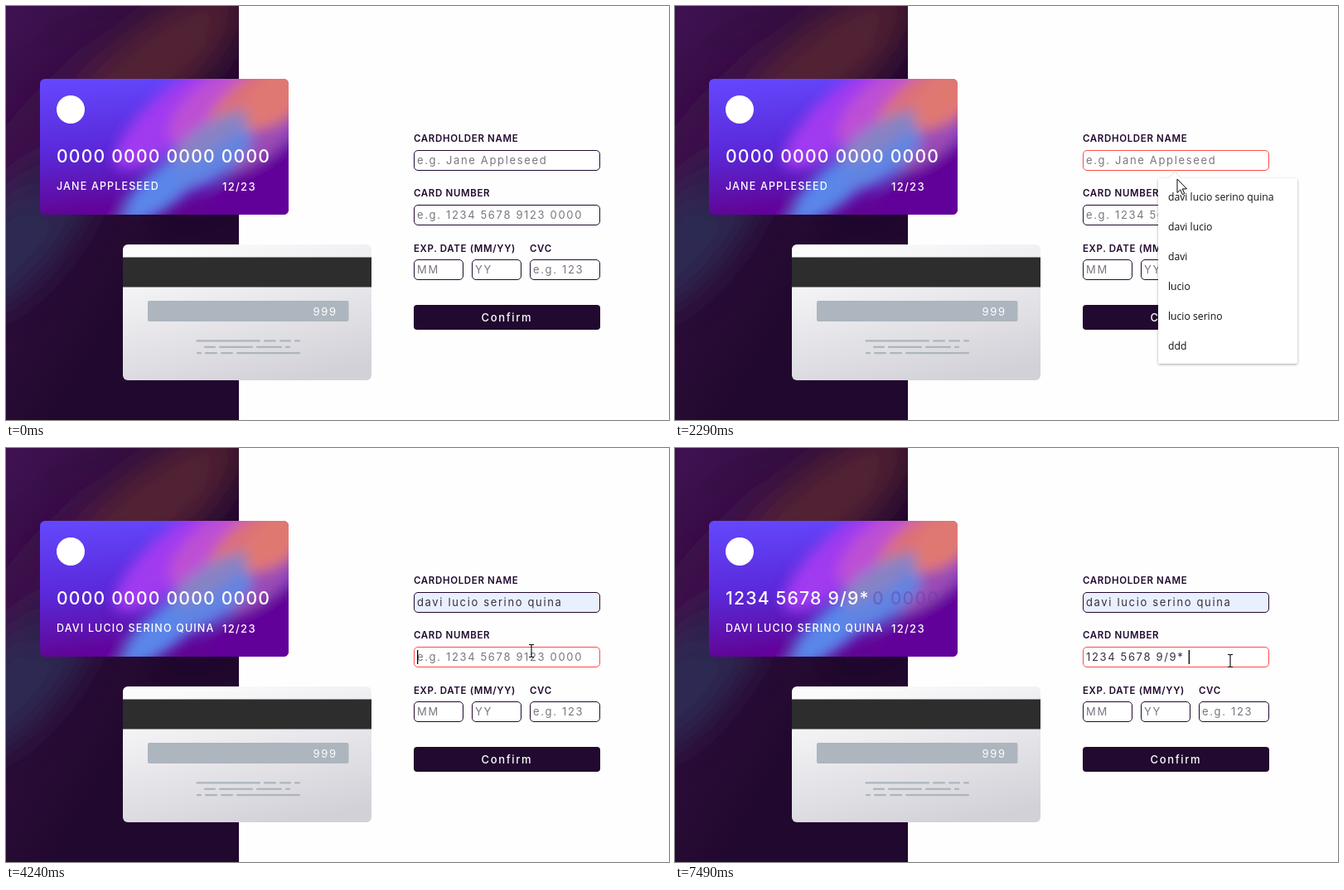
An HTML page that plays this animation: 800 by 500 pixels, repeating every 8000 ms.

```html
<!DOCTYPE html>
<html lang="en">
<head>
<meta charset="utf-8">
<title>Card form</title>
<style>
  html, body { margin: 0; width: 100%; height: 100%; overflow: hidden; background: #fefefe; }
  svg { display: block; width: 100vw; height: 100vh; }
  text { font-family: Inter, Roboto, sans-serif; white-space: pre; }
  .label { font-size: 11.5px; font-weight: 600; letter-spacing: .65px; fill: #21092f; }
  .hint { font-size: 13px; letter-spacing: 1.65px; fill: #7c7480; }
  .value { font-size: 13px; letter-spacing: 1.65px; fill: #382c42; }
  .preview { font-family: "Liberation Sans", Arial, sans-serif; font-size: 13px; letter-spacing: 1.55px; fill: #000; }
  .confirm { font-size: 13px; font-weight: 500; letter-spacing: 1.65px; fill: #fff; }
  .digits { font-size: 21.2px; font-weight: 500; letter-spacing: 1.18px; fill: #fff; }
  .owner { font-size: 12.5px; font-weight: 500; letter-spacing: 1.15px; fill: #fff; }
  .expiry { font-size: 13px; font-weight: 500; letter-spacing: 1.3px; fill: #fff; }
  .cvc { font-size: 13px; letter-spacing: 1.65px; fill: #fff; }
  .item { font-family: "Open Sans", "Noto Sans", sans-serif; font-size: 12.2px; fill: #111; }
</style>
</head>
<body>
<svg id="stage" viewBox="0 0 800 500" xmlns="http://www.w3.org/2000/svg">
  <defs>
    <linearGradient id="front" x1="0" y1="0" x2=".12" y2="1">
      <stop offset="0" stop-color="#6448fe"/>
      <stop offset=".55" stop-color="#5a28d8"/>
      <stop offset="1" stop-color="#610595"/>
    </linearGradient>
    <linearGradient id="back" x1=".3" y1="0" x2=".7" y2="1">
      <stop offset="0" stop-color="#fbfbfc"/>
      <stop offset="1" stop-color="#d2d1d8"/>
    </linearGradient>
    <linearGradient id="panel" x1="0" y1="0" x2=".75" y2=".8">
      <stop offset="0" stop-color="#401152"/>
      <stop offset=".5" stop-color="#2c0d38"/>
      <stop offset=".8" stop-color="#21082e"/>
    </linearGradient>
    <filter id="soft" x="-50%" y="-50%" width="200%" height="200%"><feGaussianBlur stdDeviation="8"/></filter>
    <filter id="softer" x="-50%" y="-50%" width="200%" height="200%"><feGaussianBlur stdDeviation="19"/></filter>
    <filter id="shadow" x="-10%" y="-10%" width="120%" height="120%">
      <feDropShadow dx="0" dy="1" stdDeviation="1.6" flood-color="#000" flood-opacity=".35"/>
    </filter>
    <clipPath id="panelClip"><rect width="281" height="500"/></clipPath>
    <clipPath id="cardClip"><rect x="41" y="88" width="300" height="164" rx="6"/></clipPath>
    <clipPath id="restClip"><rect id="restBox" x="61" y="165" width="280" height="32"/></clipPath>
  </defs>
</svg>
<script>
const stage = document.getElementById('stage');
const restBox = document.getElementById('restBox');
const INK = '#21092f', RED = '#ff4a48', GREY = '#adb5be';
const NAME = 'davi lucio serino quina';
const ZEROS = '0000 0000 0000 0000';
const LOOP = 8000;

function add(tag, attrs, parent = stage) {
  const el = document.createElementNS(stage.namespaceURI, tag);
  for (const key in attrs) el.setAttribute(key, attrs[key]);
  parent.appendChild(el);
  return el;
}
const rect = (x, y, width, height, fill, rx = 0, parent) =>
  add('rect', { x, y, width, height, fill, rx }, parent);
function text(x, y, cls, str, parent) {
  const el = add('text', { x, y, class: cls }, parent);
  el.textContent = str;
  return el;
}
const blob = (parent, x, y, rx, ry, turn, fill, opacity = 1) =>
  add('ellipse', { rx, ry, fill, opacity, transform: `translate(${x} ${y}) rotate(${turn})` }, parent);
const show = (el, on) => el.setAttribute('visibility', on ? 'visible' : 'hidden');
const put = (el, str) => { if (el.textContent !== str) el.textContent = str; };

// Dark side panel
const panel = add('g', { 'clip-path': 'url(#panelClip)' });
rect(0, 0, 281, 500, 'url(#panel)', 0, panel);
const glow = add('g', { filter: 'url(#softer)' }, panel);
blob(glow, 40, 150, 130, 34, -50, '#3d124c', .9);
blob(glow, 185, 65, 125, 46, -38, '#552432', .95);
blob(glow, 25, 270, 125, 48, -52, '#2d2c56', .9);
blob(glow, 85, 185, 80, 26, -45, '#30194a', .8);
blob(glow, 268, 165, 100, 34, -55, '#21092c', .9);
blob(glow, 290, 10, 50, 18, -50, '#35122a', .8);

// Card front
const card = add('g', { 'clip-path': 'url(#cardClip)' });
rect(41, 88, 300, 164, 'url(#front)', 0, card);
const paint = add('g', { filter: 'url(#soft)' }, card);
blob(paint, 318, 225, 85, 46, -35, '#62059a');
blob(paint, 202, 132, 92, 30, -42, '#a03af0');
blob(paint, 248, 118, 66, 27, -42, '#bd50d4');
blob(paint, 312, 158, 62, 22, -38, '#9a4cb6');
blob(paint, 298, 116, 70, 30, -40, '#dc7078');
blob(paint, 325, 112, 45, 27, -42, '#e07872');
blob(paint, 196, 214, 78, 23, -40, '#5a86ea');
blob(paint, 250, 184, 56, 23, -36, '#6084e2');
blob(paint, 246, 158, 54, 16, -32, '#8683c4');
blob(paint, 100, 258, 50, 15, -18, '#6408a2', .8);
add('circle', { cx: 78, cy: 125, r: 17, fill: '#fff' }, card);
const rest = text(61, 188.5, 'digits', ZEROS, card);
rest.setAttribute('style', 'fill: rgba(92, 62, 168, .42)');
rest.setAttribute('clip-path', 'url(#restClip)');
const digits = text(61, 188.5, 'digits', ZEROS, card);
const owner = text(61, 222, 'owner', 'JANE APPLESEED', card);
text(261, 223, 'expiry', '12/23', card);

// Card back
rect(141, 288, 300, 164, 'url(#back)', 6);
rect(141, 303.5, 300, 36, '#2d2d2d');
rect(171, 356, 242.5, 25, GREY, 2);
text(370.5, 373.5, 'cvc', '999');
[
  [403.2, 229.5, 307, 311, 326, 330, 344, 348, 355],
  [410.7, 239, 253, 257, 298, 302, 333, 337, 343],
  [418, 230, 236, 240, 255, 259, 274, 278, 355]
].forEach(([y, ...ends]) => {
  for (let i = 0; i < ends.length; i += 2) rect(ends[i], y, ends[i + 1] - ends[i], 2.3, GREY, 1);
});

// Form
function field(x, y, width, hint) {
  const box = rect(x + .5, y + .5, width - 1, 24, '#fff', 4.5);
  box.setAttribute('stroke', INK);
  return { box, hint: text(x + 4, y + 17, 'hint', hint) };
}
text(492, 164, 'label', 'CARDHOLDER NAME');
text(492, 230, 'label', 'CARD NUMBER');
text(492, 296.5, 'label', 'EXP. DATE (MM/YY)');
text(632, 296.5, 'label', 'CVC');
const nameField = field(492, 174, 225, 'e.g. Jane Appleseed');
const numberField = field(492, 240, 225, 'e.g. 1234 5678 9123 0000');
field(492, 306, 60, 'MM');
field(562, 306, 60, 'YY');
field(632, 306, 85, 'e.g. 123');
rect(492, 361, 225, 30, INK, 4);
text(573.5, 381, 'confirm', 'Confirm');
const preview = text(496, 191, 'preview', NAME);
const nameValue = text(496, 191, 'value', NAME);
const numberValue = text(496, 257, 'value', '');
const caret = rect(496, 178, 1.3, 17, '#000');

// Suggestions
const menu = add('g', {});
const sheet = add('g', { filter: 'url(#shadow)' }, menu);
rect(583, 208, 168, 224, '#fff', 2, sheet);
add('path', { d: 'M594.5 208.5 L603 200 L611.5 208.5', fill: '#fff', stroke: '#dcdcdc', 'stroke-width': .8 }, menu);
const hover = rect(583, 212, 168, 36, '#e8e9ea', 0, menu);
[NAME, 'davi lucio', 'davi', 'lucio', 'lucio serino', 'ddd']
  .forEach((str, i) => text(595, 234.5 + 36 * i, 'item', str, menu));

// Pointer
const ring = add('circle', { cx: -1, cy: -.5, r: 12, fill: '#f2ea30', opacity: .78 });
const arrow = add('path', {
  d: 'M0 0 V16.5 L3.8 12.9 L6.3 18.6 L8.8 17.5 L6.3 11.9 H11.5 Z',
  fill: '#fff', stroke: '#000', 'stroke-width': 1
});
const beam = add('path', {
  d: 'M-3 -7.5 H-1 L0 -6.7 L1 -7.5 H3 M0 -7 V7 M-3 7.5 H-1 L0 6.7 L1 7.5 H3',
  fill: 'none', stroke: '#000', 'stroke-width': 1.1
});

const path = [
  [190, 712, 443], [330, 565, 226], [470, 565, 226], [740, 577, 156], [870, 571, 162],
  [1140, 571, 162], [1480, 601, 196], [2150, 601, 196], [2290, 606, 209], [2360, 606, 209],
  [2490, 607, 220], [3430, 607, 220], [3760, 642, 256], [4000, 634, 245], [4300, 634, 245],
  [4440, 670, 257]
];
const keys = [
  [5370, '1'], [5470, '12'], [5570, '123'], [5900, '1234'], [5970, '1234 5'], [6170, '1234 56'],
  [6570, '1234 567'], [6700, '1234 5678'], [6830, '1234 5678 9'], [7290, '1234 5678 9/'],
  [7490, '1234 5678 9/9* ']
];
const resets = [1630, 3100, 4110, ...keys.map(k => k[0])];

function pointAt(t) {
  const i = path.findIndex(p => p[0] > t);
  if (i < 0) return path[path.length - 1].slice(1);
  if (i === 0) return path[0].slice(1);
  const [t0, x0, y0] = path[i - 1], [t1, x1, y1] = path[i];
  const k = (t - t0) / (t1 - t0);
  return [x0 + (x1 - x0) * k, y0 + (y1 - y0) * k];
}

const between = (t, a, b) => t >= a && t < b;

function draw(t) {
  const onName = between(t, 1620, 4110), onNumber = t >= 4110;
  const filled = t >= 3100, previewing = between(t, 2420, 3100);
  const typed = keys.filter(k => k[0] <= t).map(k => k[1]).pop() || '';

  nameField.box.setAttribute('stroke', onName ? RED : INK);
  nameField.box.setAttribute('fill', filled || previewing ? '#e8f0fe' : '#fff');
  numberField.box.setAttribute('stroke', onNumber ? RED : INK);
  show(nameField.hint, !filled && !previewing);
  show(numberField.hint, !typed);
  show(preview, previewing);
  show(nameValue, filled);
  put(numberValue, typed);
  put(owner, filled ? NAME.toUpperCase() : 'JANE APPLESEED');
  put(digits, typed.trim() || ZEROS);
  show(rest, typed);
  if (typed) restBox.setAttribute('x', 62 + digits.getComputedTextLength());

  const since = t - Math.max(...resets.filter(r => r <= t));
  show(caret, (onName || onNumber) && Math.floor(since / 530) % 2 === 0);
  let end = 0;
  if (typed) end = numberValue.getComputedTextLength();
  else if (filled && onName) end = nameValue.getComputedTextLength();
  caret.setAttribute('x', 496 + end);
  caret.setAttribute('y', onNumber ? 244 : 178);

  const fade = t < 2500 ? (t - 1620) / 130 : (3100 - t) / 70;
  menu.setAttribute('opacity', Math.max(0, Math.min(1, fade)));
  show(hover, previewing);

  const [x, y] = pointAt(t);
  const inField = x > 492 && x < 717 && (between(y, 174, 199) || between(y, 240, 265));
  [arrow, beam, ring].forEach(el => el.setAttribute('transform', `translate(${x} ${y})`));
  show(arrow, t >= 190 && !inField);
  show(beam, t >= 190 && inField);
  show(ring, between(t, 1610, 1750) || between(t, 2900, 3060) || between(t, 4040, 4240));
}

const start = performance.now();
function tick() {
  draw((performance.now() - start) % LOOP);
  requestAnimationFrame(tick);
}
tick();
</script>
</body>
</html>
```
